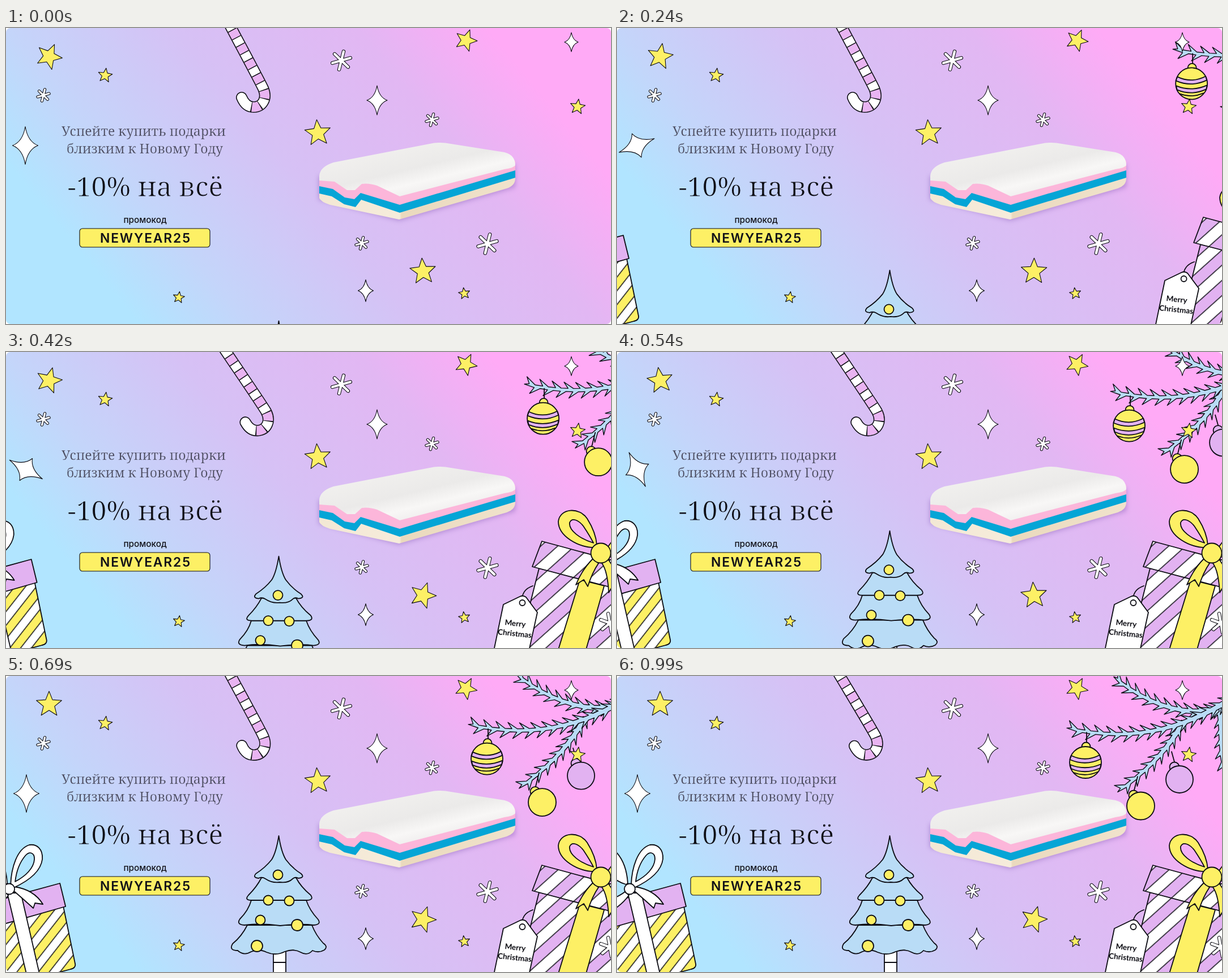
Animation, 1068 px wide and 524 px high, one loop 1320 ms. Source, as an HTML page:

```html
<!DOCTYPE html>
<html lang="ru">
<head>
<meta charset="utf-8">
<title>-10% на всё</title>
<style>
html, body { margin: 0; width: 100%; height: 100%; overflow: hidden; background: #fff; }
svg { display: block; width: 1068px; height: 524px; border-radius: 8px; }
.ink { stroke: #0b0b12; stroke-width: 1.8; stroke-linejoin: round; stroke-linecap: round; }
.thin { stroke-width: 1.1; }
.y { fill: #fdf065; } .w { fill: #fff; } .l { fill: #e2b2f1; } .b { fill: #b9dcf6; } .n { fill: none; }
.serif { font-family: "Noto Serif", serif; font-weight: 300; text-anchor: middle; stroke: url(#sky); }
.sans { font-family: Inter, sans-serif; text-anchor: middle; fill: #111118; }
.hand { font: 700 13.5px Lato, sans-serif; text-anchor: middle; fill: #0b0b12; }
</style>
</head>
<body>
<svg viewBox="0 0 1068 524" xmlns="http://www.w3.org/2000/svg">
  <defs>
    <linearGradient id="sky" gradientUnits="userSpaceOnUse" x1="-116" y1="95" x2="542" y2="-442">
      <stop offset="0" stop-color="#b1e5ff"/>
      <stop offset=".176" stop-color="#c4d5fa"/>
      <stop offset=".447" stop-color="#d6c1f5"/>
      <stop offset=".741" stop-color="#e2b7f3"/>
      <stop offset=".953" stop-color="#ffaaf6"/>
    </linearGradient>
    <linearGradient id="foam" gradientUnits="userSpaceOnUse" x1="700" y1="204" x2="722" y2="296">
      <stop offset="0" stop-color="#f1f0ee"/>
      <stop offset=".5" stop-color="#ebeae9"/>
      <stop offset=".78" stop-color="#f8f7f6"/>
      <stop offset="1" stop-color="#f0eeee"/>
    </linearGradient>
    <linearGradient id="cream" x1="0" x2="1" y1="0" y2="0">
      <stop offset="0" stop-color="#f3e8d4"/>
      <stop offset=".41" stop-color="#f6ecdb"/>
      <stop offset=".42" stop-color="#ead9bd"/>
      <stop offset="1" stop-color="#f0e3cc"/>
    </linearGradient>
    <filter id="soft" x="-10%" y="-20%" width="120%" height="150%"><feGaussianBlur stdDeviation="4"/></filter>
    <pattern id="lilac" width="40" height="40" patternUnits="userSpaceOnUse" patternTransform="translate(955 440) rotate(48)">
      <rect width="40" height="40" fill="#fff"/>
      <path d="M1 -1H21V41H1Z" class="l ink" style="stroke-width:1.5"/>
    </pattern>
    <pattern id="lilacBody" href="#lilac" patternTransform="translate(968.4 454.9) rotate(48)"/>
    <pattern id="lemon" width="30" height="40" patternUnits="userSpaceOnUse" patternTransform="translate(107.800 479.200) rotate(38)">
      <rect width="30" height="40" fill="#fff"/>
      <path d="M1 -1H16V41H1Z" class="y ink" style="stroke-width:1.5"/>
    </pattern>
  </defs>

  <rect width="1068" height="524" fill="url(#sky)"/>

  <g class="serif">
    <g font-size="23" fill="#454557" stroke-width=".3">
      <text x="243" y="191">Успейте купить подарки</text>
      <text x="245" y="222">близким к Новому Году</text>
    </g>
    <text x="246" y="298" font-size="48" fill="#0d0d14" stroke-width="1.1">-10% на всё</text>
  </g>
  <text class="sans" x="245.5" y="345" font-size="15.3" font-weight="500">промокод</text>
  <rect x="130" y="355" width="230" height="33" rx="5" class="y ink thin"/>
  <text class="sans" x="246.5" y="380" font-size="22.8" font-weight="600" letter-spacing="1.9">NEWYEAR25</text>

  <g id="cane" fill="none"></g>

  <g id="pillow">
    <path d="M552 262V304L694 341L899 282V240Z" fill="#8a62b8" opacity=".5" filter="url(#soft)"/>
    <path d="M553 285V301Q556 308 572 313L694 339L884 284Q899 279 899 266V250L695 318Z" fill="url(#cream)"/>
    <path d="M553 279L577 284L598 299L615 302L626 291L695 312L899 251V265L695 327L627 304L617 317L597 312L575 298L553 293Z" fill="#05a5d6"/>
    <path d="M553 263L600 275L640 268L695 292L899 235V252L695 313L626 292L615 303L598 300L577 285L553 280Z" fill="#fcb6da"/>
    <path d="M553 270V262Q554 246 578 238L748 205Q766 201 785 205L880 220Q899 225 899 243Q896 248 880 250L695 298L655 279Q640 274 628 276L616 287L602 287L580 272Z" fill="url(#foam)"/>
  </g>

  <g id="tree" class="ink">
    <path d="M472 486V540H494V486Z" class="w"/>
    <path d="M472 507H494" class="n"/>
    <path d="M426 441Q416 461 400 474Q393 486 409 486Q420 496 433 488Q446 482 460 489Q476 496 492 488Q508 482 520 489Q532 496 541 486Q552 491 562 485Q569 479 560 473Q547 459 540 441Z" class="b"/>
    <path d="M433 397Q428 415 413 430Q406 440 421 441Q450 437 484 442Q520 438 543 441Q557 440 551 431Q536 415 530 397Z" class="b"/>
    <path d="M451 357Q443 373 428 388Q420 397 434 397H530Q544 397 538 388Q520 373 512 357Z" class="b"/>
    <path d="M481.500 283Q477 312 469 325Q458 339 441 350Q435 357 446 358Q452 355 458 359Q470 367 483 365Q498 367 506 359Q510 355 516 358Q528 357 521 350Q505 340 494 325Q486 312 481.500 283Z" class="b"/>
    <g class="y">
      <circle cx="480" cy="352" r="8.500"/>
      <circle cx="463" cy="397" r="8.500"/>
      <circle cx="500" cy="398" r="8.500"/>
      <circle cx="449" cy="432" r="8.500"/>
      <circle cx="514" cy="441" r="10"/>
      <circle cx="443" cy="478" r="10"/>
    </g>
  </g>

  <g id="boxR" class="ink">
    <path d="M941 383L904 530H1140V430Z" fill="url(#lilacBody)"/>
    <path d="M946 335L929 380L1130 433V385Z" fill="url(#lilac)"/>
    <path d="M1013 403L974 530H1023L1056 414Z" class="y"/>
    <path d="M1060 350Q1072 325 1100 318V368L1062 362Z" class="y"/>
    <path d="M1039 346C1010 346 975 326 975 300C978 276 1012 274 1026 295C1036 311 1042 328 1043 342ZM1037 338C1033 330 1027 320 1019 308C1011 298 999 292 995 302C993 316 1014 331 1037 338Z" class="y" fill-rule="evenodd"/>
    <path d="M1036 366Q1017 385 1006 412L1020 403L1027 415Q1035 390 1046 374Z" class="y"/>
    <path d="M1052 374Q1062 388 1064 426L1072 412L1084 424Q1078 385 1062 366Z" class="y"/>
    <circle cx="1050" cy="356" r="17.500" class="y"/>
    <path d="M911 443Q909 421 930 414" class="n"/>
    <path d="M878 447L907 433Q913 430 918 434L938 461L922 534H860Z" class="w"/>
    <circle cx="911.500" cy="444" r="5" class="w"/>
    <g stroke="none" class="hand" transform="rotate(6 898 490)">
      <text x="898" y="485">Merry</text>
      <text x="899" y="503">Christmas</text>
    </g>
  </g>

  <g id="boxL" class="ink">
    <path d="M-60 450L118 408L139 510Q140 517 131 519L90 530H-60Z" fill="url(#lemon)"/>
    <path d="M-60 414L112 367L122 408L-60 460Z" class="l"/>
    <path d="M19 384L54 532H77L43 384Z" class="w"/>
    <path d="M16 369C-10 362 -40 330 -28 306C-14 292 16 318 19 367Z" class="w"/>
    <path d="M14 382Q4 390 -20 400L-8 404L-10 416Q10 404 21 388Z" class="w"/>
    <path d="M30 380Q44 392 65 411L68 402L82 404Q66 378 31 373Z" class="w"/>
    <path d="M25 370C26 340 36 306 58 299C72 297 82 307 81 324C78 348 54 364 30 375ZM33 364C52 354 66 340 67 324C67 312 58 310 51 318C40 331 35 346 33 364Z" class="w" fill-rule="evenodd"/>
    <circle cx="22.500" cy="377" r="9.500" class="w"/>
  </g>

  <g id="branch" class="ink">
    <g id="twigs" class="b" style="stroke-width:1.400"></g>
    <path d="M829 100V118M919 178L913 202M979 134L984 152" class="n"/>
    <circle cx="828" cy="125" r="7.500" class="y"/>
    <circle cx="827" cy="153" r="28" class="y"/>
    <path d="M802 141Q827 153 852 140L854 147Q827 160 799.500 148Z" class="l"/>
    <path d="M800 157Q827 168 854.500 156L853 163Q827 175 801.500 164Z" class="l"/>
    <path d="M806 171Q827 179 848 170" class="n"/>
    <circle cx="912" cy="211" r="8.500" class="y"/>
    <circle cx="924.500" cy="230" r="24.500" class="y"/>
    <circle cx="984" cy="161" r="8.500" class="l"/>
    <circle cx="993" cy="183" r="24" class="l"/>
  </g>

  <g id="sparks"></g>
</svg>

<script>
const $ = id => document.getElementById(id);

function add(parent, tag, attrs) {
  const el = document.createElementNS("http://www.w3.org/2000/svg", tag);
  for (const k in attrs) el.setAttribute(k, attrs[k]);
  return parent.appendChild(el);
}

const pose = (el, x, y, a = 0) => el.setAttribute("transform", `translate(${x} ${y}) rotate(${a})`);

function star(x, y, r, a) {
  const pts = Array.from({ length: 10 }, (_, i) => {
    const d = i % 2 ? r * .44 : r, q = i * Math.PI / 5;
    return (d * Math.sin(q)).toFixed(2) + "," + (-d * Math.cos(q)).toFixed(2);
  });
  const el = add($("sparks"), "polygon", { points: pts.join(" "), class: "y ink thin" });
  pose(el, x, y, a);
  return el;
}

function sparkle(x, y, w, h) {
  const k = .2, a = w * k, b = h * k;
  const d = `M0 ${-h}Q${a} ${-b} ${w} 0Q${a} ${b} 0 ${h}Q${-a} ${b} ${-w} 0Q${-a} ${-b} 0 ${-h}Z`;
  const el = add($("sparks"), "path", { d, class: "w ink thin" });
  pose(el, x, y);
  return el;
}

function flake(parent, x, y, r, a) {
  const g = add(parent, "g", { fill: "none", "stroke-linecap": "round" });
  let d = "";
  for (let i = 0; i < 3; i++) {
    const c = (r * Math.cos(i * Math.PI / 3)).toFixed(2), s = (r * Math.sin(i * Math.PI / 3)).toFixed(2);
    d += `M${c} ${s}L${-c} ${-s}`;
  }
  const w = r * .2 + 1;
  add(g, "path", { d, stroke: "#0b0b12", "stroke-width": w + 2.1 });
  add(g, "path", { d, stroke: "#fff", "stroke-width": w });
  pose(g, x, y, a);
}

// A fir twig: a tapering stem along a Bezier curve with needles leaning to its tip.
function twig(p, n, len) {
  const at = u => {
    const v = 1 - u, k = [v * v * v, 3 * v * v * u, 3 * v * u * u, u * u * u];
    return [0, 1].map(j => k.reduce((s, c, i) => s + c * p[i][j], 0));
  };
  const off = (u, side, out, fwd) => {
    const [x, y] = at(u), [x2, y2] = at(u + .01), l = Math.hypot(x2 - x, y2 - y);
    const tx = (x2 - x) / l, ty = (y2 - y) / l;
    return (x + tx * fwd - ty * out * side).toFixed(1) + " " + (y + ty * fwd + tx * out * side).toFixed(1);
  };
  const sideOf = side => {
    const segs = [];
    for (let i = 0; i < n; i++) {
      const u = (i + (side > 0 ? .4 : 0)) / n, w = 4.8 - 2.5 * u;
      segs.push([off(u, side, w, 0), off(u, side, len, len * 1.2), off(u + .35 / n, side, w, 2)]);
    }
    return segs;
  };
  let d = "M" + off(0, 1, 4, 0);
  for (const [a, b, c] of sideOf(1)) d += `L${a}L${b}L${c}`;
  d += "L" + off(1, 1, 0, 4);
  for (const [a, b, c] of sideOf(-1).reverse()) d += `L${c}L${b}L${a}`;
  add($("twigs"), "path", { d: d + "Z" });
}

twig([[1062, 52], [1070, 90], [1062, 120], [1072, 165]], 6, 12);
twig([[1062, 58], [1000, 75], [930, 45], [880, 4]], 10, 14);
twig([[1000, 80], [975, 125], [945, 160], [887, 203]], 9, 13);
twig([[1088, 38], [1010, 88], [920, 120], [798, 93]], 15, 14);

// Candy cane, drawn from the hook's end upward; the origin is its pivot.
const bend = "C20 78 30 64 22 45C12 24 -25 -44 -66 -122";
const tube = "M-16 61C-11 73 -4 78 5 78" + bend;
const bands = "M-7 74C-3.5 76.8 .5 78 5 78" + bend;
for (const [d, stroke, width, dash, shift] of [
  [tube, "#0b0b12", 20, "none", 0],
  [tube, "#fff", 16.8, "none", 0],
  [bands, "#0b0b12", 17, "17 13", -8.5],
  [bands, "#e9b4f2", 16.8, "14 16", -10]
]) add($("cane"), "path", {
  d, stroke, "stroke-width": width, "stroke-dasharray": dash,
  "stroke-dashoffset": shift, "stroke-linecap": d === tube ? "round" : "butt"
});

flake($("boxR"), 1066, 480, 17, 20);
[[592, 57.5, 16.5], [66, 119, 10.5], [752, 162.5, 10.5], [628, 381, 10.5], [850, 382, 17]]
  .forEach(f => flake($("sparks"), ...f, -16));
sparkle(998, 25, 12, 17);
sparkle(655, 128, 18, 26);
sparkle(635, 465, 13.5, 19.5);
const spin = sparkle(35, 208, 22.5, 33.5);
[[175, 84, 13, 8], [1009, 139.5, 13.8, 8], [550.5, 186, 23.8, -5], [809, 470, 10.5, -8], [305, 477, 10.5, 8]]
  .forEach(s => star(...s));
const starA = star(76, 50.5, 23.5, 0);
const starB = star(736, 432, 23.8, 0);
const starC = star(812, 22, 20, 0);

const left = (t, end) => Math.max(0, end - t);
const wave = (t, from, half) => Math.cos((t - from) / half * Math.PI);

function ease(t, keys) {
  for (let i = 1; i < keys.length; i++) {
    const [t0, a] = keys[i - 1], [t1, b] = keys[i];
    if (t <= t1) return a + (b - a) * (1 - wave(t, t0, t1 - t0)) / 2;
  }
  return keys[keys.length - 1][1];
}

function draw(t) {
  pose($("tree"), 0, left(t, 630) * .374);
  pose($("boxR"), left(t, 420) * .495, 0);
  pose($("boxL"), -left(t, 780) * .187, 0);
  pose($("branch"), left(t, 750) * .367, -left(t, 750) * .107);
  pose($("cane"), 432, 62, -(2.2 + 4.4 * wave(t, 480, t < 480 ? 360 : 330)));
  pose(spin, 34 + 2 * Math.min(1, t / 630), 208, 180 - left(t, 630) * 180 / 630);
  pose(starA, 76, 50.5, ease(t, [[0, 24], [240, 10], [420, 15], [540, -8], [630, 0]]));
  pose(starB, 736, 431, 7 + 12 * wave(t, 420, 135));
  pose(starC, 812, 22, 20 + 8 * Math.min(1, t / 540));
}

const start = performance.now();
function tick() {
  const t = (performance.now() - start) % 1320;
  draw(Math.min(990, Math.floor(t / 30) * 30));
  requestAnimationFrame(tick);
}
tick();
</script>
</body>
</html>
```
